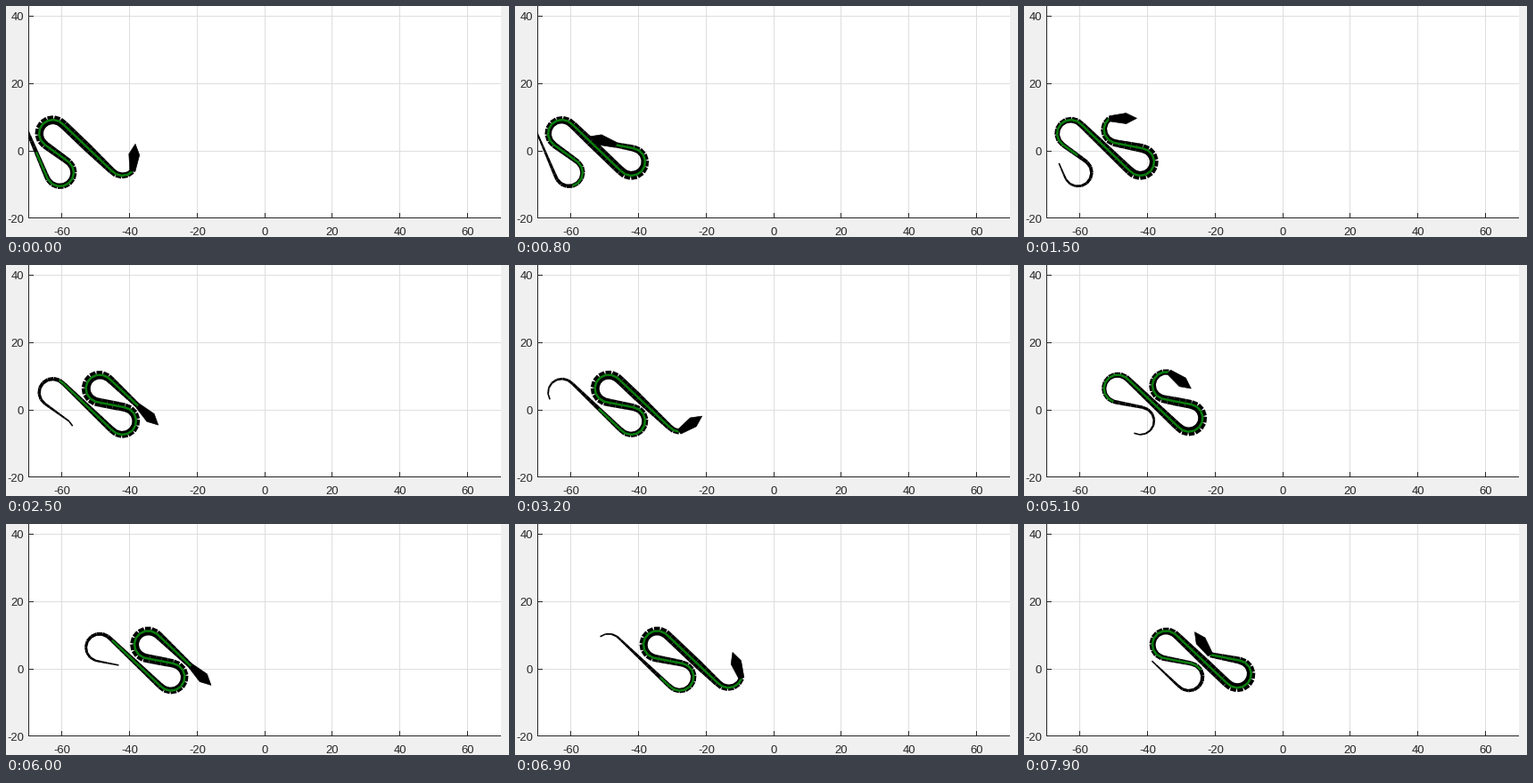
A matplotlib script for the animation above (8 s loop, 564 px wide and 260 px high).

```python
import numpy as np
import matplotlib.pyplot as plt
from matplotlib.animation import FuncAnimation
from matplotlib.collections import LineCollection
from matplotlib.patches import Polygon, Rectangle

W, H, DPI = 564, 260, 80
PT = 72 / DPI                      # points per pixel
LEFT, RIGHT, BOTTOM = 25, 555, 238
UNIT = (RIGHT - LEFT) / 140        # pixels per axis unit
FRAMES, INTERVAL = 80, 100
INK, GRID = "#262626", "#dedede"

# The track is a chain of circular loops joined by straight tangents:
# lower loops turn one way (-1), upper loops the other (+1).
RADIUS = 15.5
ENTRY = np.radians(67)             # heading on arrival at the first loop
FIRST_LOWER, FIRST_UPPER = (60, 187), (52, 143)
LOWER, UPPER = np.array([130, 175]), np.array([104.5, 138.5])
DRIFT = np.array([54.4, -3.3])     # shift from one wave to the next
WAVES = 4

SEGMENTS = 54                      # body pieces between tail and neck
STEPS_PER_WAVE = 34


def on_loop(center, turn, heading):
    """Point of a loop that is passed with the given heading."""
    offset = np.column_stack([np.sin(heading), -np.cos(heading)])
    return center + turn * RADIUS * offset


def build_track():
    """Points along all loops, and the index where each loop begins."""
    centers = [np.array(FIRST_LOWER), np.array(FIRST_UPPER)]
    for n in range(WAVES):
        centers += [LOWER + n * DRIFT, UPPER + n * DRIFT]
    heading, turn = ENTRY, -1
    start = on_loop(centers[0], turn, np.array([heading]))
    parts = [start - 150 * np.array([np.cos(heading), np.sin(heading)])]
    begins, count = [], 1
    for here, there in zip(centers, centers[1:]):
        dx, dy = there - here
        tangent = np.arctan2(dy, dx) + turn * np.arcsin(
            2 * RADIUS / np.hypot(dx, dy))
        sweep = turn * ((turn * (tangent - heading)) % (2 * np.pi))
        arc_points = on_loop(here, turn, heading + np.linspace(0, sweep, 60))
        parts.append(arc_points)
        begins.append(count)
        count += len(arc_points)
        heading, turn = tangent, -turn
    return np.vstack(parts), begins


track, begins = build_track()
arc = np.concatenate([[0], np.cumsum(np.hypot(*np.diff(track, axis=0).T))])
upper_a, upper_b = arc[begins[3]], arc[begins[5]]
step = (upper_b - upper_a) / STEPS_PER_WAVE
neck_start = upper_a - 9.7 * step


def at(node):
    s = neck_start + np.asarray(node) * step
    return np.column_stack([np.interp(s, arc, track[:, 0]),
                            np.interp(s, arc, track[:, 1])])


def step_count(frame):
    """The picture stands still twice; only the second pause costs a step."""
    if frame == 12:
        return 11
    return frame - 1 if frame >= 71 else frame


fig = plt.figure(figsize=(W / DPI, H / DPI), dpi=DPI, facecolor="#f0f0f0")
ax = fig.add_axes([0, 0, 1, 1])
ax.set_xlim(-0.5, W - 0.5)
ax.set_ylim(H - 0.5, -0.5)
ax.axis("off")


def box(x0, y0, x1, y1, color, z):
    """Fill whole pixels, both ends included."""
    patch = Rectangle((x0 - 0.5, y0 - 0.5), x1 - x0 + 1, y1 - y0 + 1,
                      facecolor=color, edgecolor="none", zorder=z)
    ax.add_patch(patch)
    return patch


stage = box(LEFT, 0, RIGHT - 1, BOTTOM, "white", 0)
font = dict(family="Liberation Sans", size=13 * PT, color=INK,
            va="baseline")
for v in range(-60, 61, 20):
    x = int(LEFT + UNIT * (v + 70))
    box(x, 0, x, BOTTOM, GRID, 1)
    box(x, BOTTOM - 5, x, BOTTOM, INK, 2)
    ax.text(x, 258, f"{v}", ha="center", **font)
for v in range(-20, 41, 20):
    y = int(BOTTOM + 0.8 - UNIT * (v + 20))
    box(LEFT, y, RIGHT - 1, y, GRID, 1)
    box(LEFT, y, LEFT + 5, y, INK, 2)
    ax.text(19.5, y + 5, f"{v}", ha="right", **font)
box(LEFT, 0, LEFT, BOTTOM, INK, 2)
box(LEFT, BOTTOM, RIGHT - 1, BOTTOM, INK, 2)

# Body width grows from the tail and narrows again at the neck.
piece = np.arange(SEGMENTS) + 0.5
growth = np.minimum(1.5 + 0.235 * piece, 9.8)
width = np.minimum(growth, 6 + 0.4 * (SEGMENTS - piece))
striped = width > 4.5

body = LineCollection([], colors="black", linewidths=width * PT,
                      capstyle="butt", zorder=3)
stripe = LineCollection([], colors="#087f0c", linewidths=2.5 * PT,
                        capstyle="butt", zorder=4)
HEAD = np.array([(0, -3), (19, -6), (31, 0), (19, 6), (0, 3)])
head = Polygon(HEAD, closed=True, facecolor="black", edgecolor="black",
               linewidth=0.6 * PT, zorder=5)
ax.add_collection(body, autolim=False)
ax.add_collection(stripe, autolim=False)
ax.add_patch(head)
for part in (body, stripe, head):
    part.set_clip_path(stage)


def draw(frame):
    n = step_count(frame)
    nodes = at(np.arange(n - SEGMENTS, n + 1))
    pieces = np.stack([nodes[:-1], nodes[1:]], axis=1)
    body.set_segments(pieces)
    stripe.set_segments(pieces[striped])
    neck, ahead = at([n, n + 3])
    d = (ahead - neck) / np.hypot(*(ahead - neck))
    side = np.array([-d[1], d[0]])
    head.set_xy(neck + HEAD[:, :1] * d + HEAD[:, 1:] * side)
    return body, stripe, head


anim = FuncAnimation(fig, draw, frames=FRAMES, interval=INTERVAL,
                     init_func=lambda: draw(0), repeat=True, repeat_delay=0,
                     blit=False)
plt.show()
```
